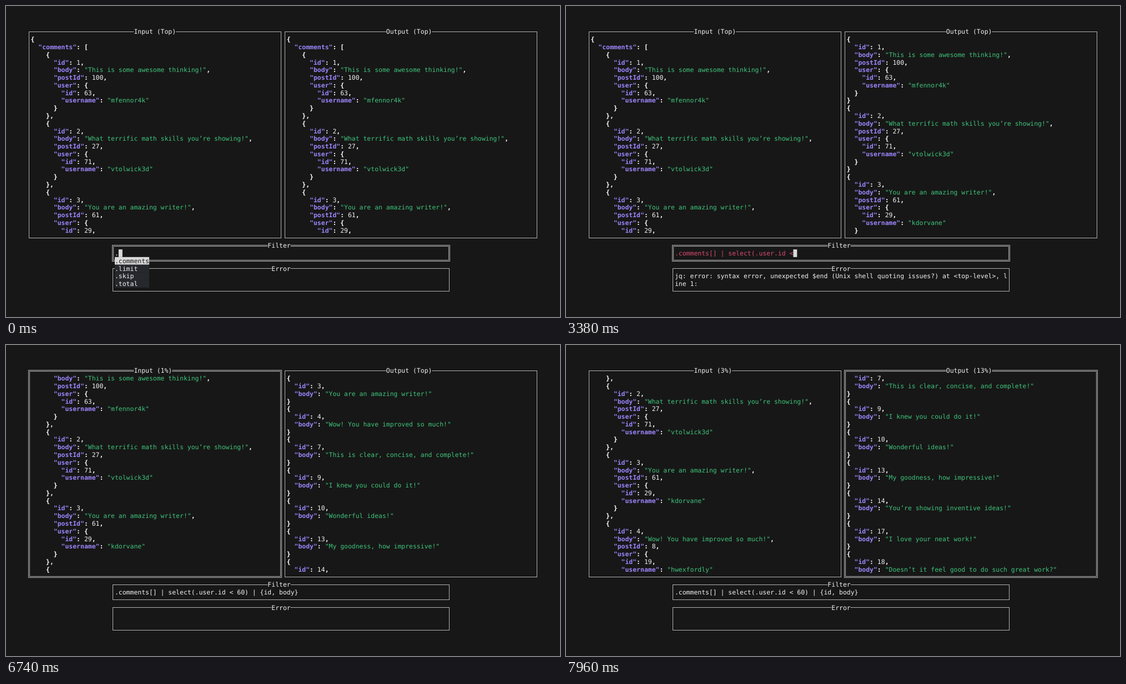
Animation of 998x561 px, one loop 8000 ms. Source, as an HTML page with a canvas:

```html
<!DOCTYPE html>
<html lang="en">
<head>
<meta charset="utf-8">
<title>Interactive JSON filter</title>
<style>
html, body { margin: 0; width: 100%; height: 100%; overflow: hidden; background: #171717; }
canvas { display: block; width: 998px; height: 561px; }
</style>
</head>
<body>
<canvas id="stage" width="998" height="561"></canvas>
<script>
const ctx = document.getElementById('stage').getContext('2d');
const LOOP = 8000;

// Terminal grid
const CW = 6.885, CH = 13.775, LEFT = 37.6, TOP = 39.6;
const FONT = '11.44px "DejaVu Sans Mono", monospace';
const ROWS = 26, FIELD = 23, ERROR_COLS = 87;

const C = {
  bg: '#171717', text: '#f2f2f2', punct: '#ffffff', key: '#9d86fc', string: '#3fc47c',
  none: '#6c6c6c', bad: '#dc4a70', line: '#b2b2b2', cursor: '#d9d9d9', menu: '#26282d'
};

// Data
const comment = (id, body, postId, userId, username) =>
  ({ id, body, postId, user: { id: userId, username } });

const comments = [
  comment(1, 'This is some awesome thinking!', 100, 63, 'mfennor4k'),
  comment(2, 'What terrific math skills you’re showing!', 27, 71, 'vtolwick3d'),
  comment(3, 'You are an amazing writer!', 61, 29, 'kdorvane'),
  comment(4, 'Wow! You have improved so much!', 8, 19, 'hwexfordly'),
  comment(7, 'This is clear, concise, and complete!', 47, 22, 'glumbern'),
  comment(9, 'I knew you could do it!'),
  comment(10, 'Wonderful ideas!'),
  comment(13, 'My goodness, how impressive!'),
  comment(14, 'You’re showing inventive ideas!'),
  comment(17, 'I love your neat work!'),
  comment(18, 'Doesn’t it feel good to do such great work?')
];
const chosen = comments.slice(2);
const print = v => JSON.stringify(v, null, 2).split('\n');
const printAll = list => list.flatMap(print);

const whole = print({ comments });
const list = print(comments);
const each = printAll(comments);
const selected = printAll(chosen);
const picked = printAll(chosen.map(({ id, body }) => ({ id, body })));
const INPUT_LINES = 276, OUTPUT_LINES = 68;

// Filter evaluation
function run(filter) {
  if (filter === '.') return whole;
  if (filter === '.comments') return list;
  if (/^\.\w+$/.test(filter)) return ['null'];
  if (/\] ?$/.test(filter)) return each;
  if (/\) ?$/.test(filter)) return selected;
  if (/\}$/.test(filter)) return picked;
  return null;
}

function lastOutput(filter) {
  while (!run(filter)) filter = filter.slice(0, -1);
  return run(filter);
}

function errorLines(filter) {
  if (run(filter)) return [];
  const name = filter.match(/\| (\w+)$/);
  const expecting = /\w\.$/.test(filter) ? ', expecting FORMAT or QQSTRING_START' : '';
  const reason = name
    ? `${name[1]}/0 is not defined`
    : `syntax error, unexpected $end${expecting} (Unix shell quoting issues?)`;
  const first = `jq: error: ${reason} at <top-level>, line 1:`;
  const wrapped = first.match(new RegExp(`.{1,${ERROR_COLS}}`, 'g'));
  return [...wrapped, filter].slice(0, 2);
}

// Typing: one key every 100 ms within each burst
const KEY_MS = 100;
const bursts = [
  [480, 'comments[] | selec'],
  [2280, 't(.user.id < 60)'],
  [4340, ' | {id, body}']
];

function typedAt(t) {
  let text = '.';
  for (const [start, keys] of bursts) {
    if (t >= start) text += keys.slice(0, Math.floor((t - start) / KEY_MS) + 1);
  }
  return text;
}

// Some results arrive one tick after the key
function evaluatedAt(t) {
  const now = typedAt(t), before = typedAt(t - 20);
  return /(\]|selec|\)|\})$/.test(now) ? before : now;
}

function suggestions(text) {
  return ['.comments', '.limit', '.skip', '.total'].filter(s => s.startsWith(text));
}

function scrollAt(t, start, max) {
  return t < start ? 0 : Math.min(max, Math.floor((t - start) / 50) + 1);
}

// Drawing
const colX = c => LEFT + c * CW;
const rowY = r => TOP + r * CH;

function put(str, col, row, color, bold) {
  ctx.font = (bold ? 'bold ' : '') + FONT;
  ctx.fillStyle = color;
  const y = rowY(row) + CH / 2 + 4;
  [...str].forEach((ch, i) => {
    if (ch !== ' ') ctx.fillText(ch, colX(col + i), y);
  });
}

function block(col, row, cols, color) {
  ctx.fillStyle = color;
  ctx.fillRect(colX(col), rowY(row), cols * CW, CH);
}

function putJson(line, col, row) {
  for (const m of line.matchAll(/("[^"]*")(:?)|\d+|null|[^\s\w"]/g)) {
    const at = col + m.index;
    if (m[1]) {
      put(m[1], at, row, m[2] ? C.key : C.string, !!m[2]);
      if (m[2]) put(':', at + m[1].length, row, C.punct, true);
    } else if (m[0] === 'null') put(m[0], at, row, C.none, true);
    else if (/\d/.test(m[0])) put(m[0], at, row, C.text);
    else put(m[0], at, row, C.punct, true);
  }
}

function box(c0, r0, c1, r1, title, focused) {
  const px = v => Math.round(v - 0.5);
  const x0 = px(colX(c0 + 0.5)), x1 = px(colX(c1 + 0.5));
  const y0 = px(rowY(r0 + 0.5)), y1 = px(rowY(r1 + 0.5));
  ctx.strokeStyle = C.line;
  ctx.lineWidth = 1;
  for (const d of focused ? [-1, 1] : [0]) {
    ctx.strokeRect(x0 + d + 0.5, y0 + d + 0.5, x1 - x0 - 2 * d, y1 - y0 - 2 * d);
  }
  const col = c0 + Math.floor((c1 - c0 + 1 - title.length) / 2);
  block(col, r0, title.length, C.bg);
  put(title, col, r0, C.text);
}

function pane(col, name, lines, offset, total, focused) {
  const place = offset ? Math.floor(offset * 100 / total) + '%' : 'Top';
  box(col, 0, col + 66, 27, `${name} (${place})`, focused);
  lines.slice(offset, offset + ROWS).forEach((line, i) => putJson(line, col + 1, i + 1));
}

function draw(t) {
  const text = typedAt(t), result = evaluatedAt(t);
  const focus = t < 6340 ? 'filter' : t < 7320 ? 'input' : 'output';

  ctx.fillStyle = C.bg;
  ctx.fillRect(0, 0, 998, 561);
  pane(0, 'Input', whole, scrollAt(t, 6580, 10), INPUT_LINES, focus === 'input');
  pane(67, 'Output', lastOutput(result), scrollAt(t, 7560, 9), OUTPUT_LINES, focus === 'output');

  box(22, 28, 110, 30, 'Filter', focus === 'filter');
  put(text, FIELD, 29, run(result) ? C.text : C.bad);
  if (focus === 'filter') block(FIELD + text.length, 29, 1, C.cursor);

  box(22, 31, 110, 34, 'Error', false);
  errorLines(result).forEach((line, i) => put(line, FIELD, 32 + i, C.text));

  const items = suggestions(text);
  items.forEach((item, i) => {
    block(FIELD, 30 + i, 9, i ? C.menu : C.cursor);
    put(item, FIELD, 30 + i, i ? C.text : C.bg);
  });
}

let shown = -1;
function tick() {
  const t = Math.floor(performance.now() % LOOP / 20) * 20;
  if (t !== shown) draw(shown = t);
  requestAnimationFrame(tick);
}
ctx.textRendering = 'geometricPrecision';
tick();
</script>
</body>
</html>
```
